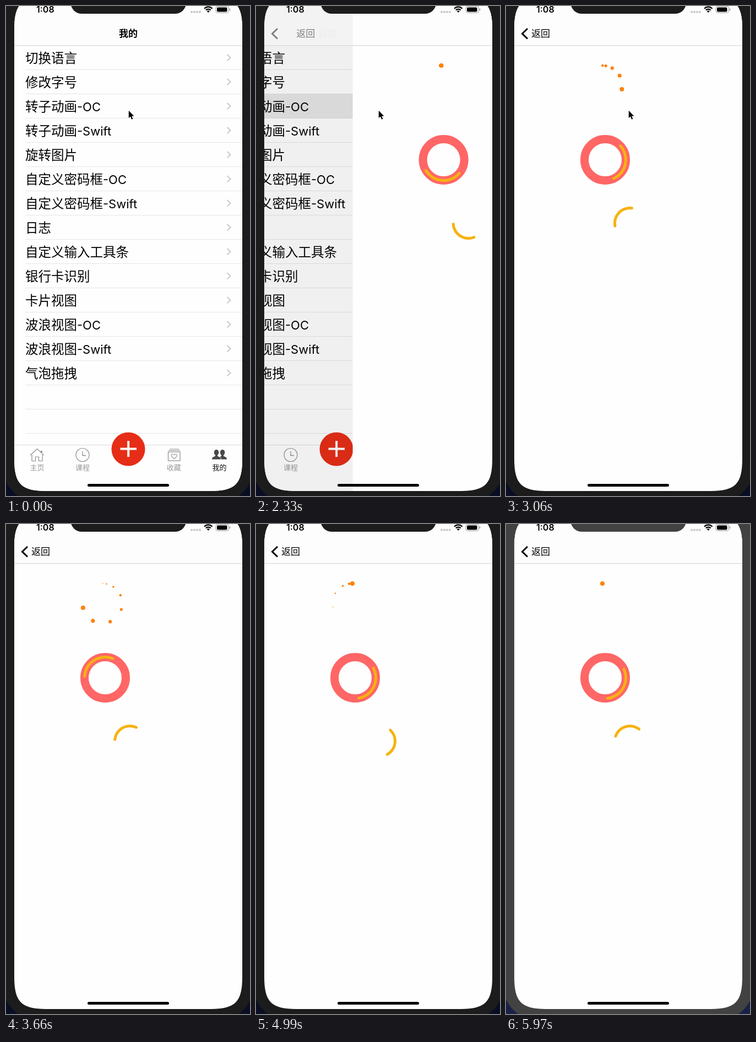
An HTML page with a canvas for the animation above (6.07 s loop, 443 by 889 pixels).

```html
<!DOCTYPE html>
<html lang="zh-CN">
<head>
<meta charset="utf-8">
<style>
html, body { margin: 0; width: 100%; height: 100%; overflow: hidden; background: #0a0e24; }
canvas { display: block; width: 443px; height: 889px; }
</style>
</head>
<body>
<canvas id="stage"></canvas>
<script>
const W = 443, H = 889, LOOP = 6070, TAU = Math.PI * 2;
const CJK = '"Noto Sans CJK SC", sans-serif', LATIN = 'Inter, "Noto Sans CJK SC", sans-serif';
const SX = 15, SW = 414, BOTTOM = 880;
const ROWS = ['切换语言', '修改字号', '转子动画-OC', '转子动画-Swift', '旋转图片', '自定义密码框-OC',
  '自定义密码框-Swift', '日志', '自定义输入工具条', '银行卡识别', '卡片视图', '波浪视图-OC', '波浪视图-Swift', '气泡拖拽'];

const RUNS = [[2210, 2210, 1], [2330, 2430, 2], [2530, 2530, 1], [2650, 2740, 2], [2830, 3060, 4],
  [3120, 3430, 6], [3520, 4110, 10], [4190, 4250, 2], [4340, 4760, 8], [4850, 4990, 3],
  [5040, 5420, 7], [5480, 5800, 6], [5970, 5970, 1]];
// Playback time to app time since the push began
const CLOCK = [[2222, 0], [2530, 324], [3060, 882], [4250, 2148], [4990, 2922], [5970, 3932]];

const canvas = document.getElementById('stage');
const ctx = canvas.getContext('2d');
const dpr = window.devicePixelRatio || 1;
canvas.width = W * dpr;
canvas.height = H * dpr;

const clamp = (v, a = 0, b = 1) => Math.min(b, Math.max(a, v));

function snap(t) {
  const run = RUNS.filter(r => r[0] <= t).pop();
  if (!run) return 0;
  const [first, last, n] = run;
  if (n === 1) return first;
  const step = (last - first) / (n - 1);
  return first + step * Math.min(n - 1, Math.floor((t - first) / step + 1e-6));
}

function appTime(t) {
  if (t <= CLOCK[0][0]) return 0;
  for (let i = 1; i < CLOCK.length; i++) {
    const [t0, a] = CLOCK[i - 1], [t1, b] = CLOCK[i];
    if (t <= t1) return a + (b - a) * (t - t0) / (t1 - t0);
  }
  return CLOCK[CLOCK.length - 1][1];
}

// cubic-bezier(.42, 0, .58, 1)
function easeInOut(x) {
  x = clamp(x);
  let lo = 0, hi = 1;
  for (let i = 0; i < 24; i++) {
    const s = (lo + hi) / 2, r = 1 - s;
    if (3 * r * r * s * .42 + 3 * r * s * s * .58 + s ** 3 < x) lo = s; else hi = s;
  }
  return 3 * (1 - lo) * lo * lo + lo ** 3;
}

function rect(x, y, w, h, color) {
  ctx.fillStyle = color;
  ctx.fillRect(x, y, w, h);
}

function round(x, y, w, h, r, color) {
  ctx.beginPath();
  ctx.roundRect(x, y, w, h, r);
  ctx.fillStyle = color;
  ctx.fill();
}

function disc(x, y, r, color) {
  ctx.beginPath();
  ctx.arc(x, y, r, 0, TAU);
  ctx.fillStyle = color;
  ctx.fill();
}

function arc(x, y, r, from, to, width, color, cap = 'round') {
  ctx.beginPath();
  ctx.arc(x, y, r, from, to);
  ctx.lineWidth = width;
  ctx.lineCap = cap;
  ctx.strokeStyle = color;
  ctx.stroke();
}

function line(points, width, color, cap = 'butt') {
  ctx.beginPath();
  points.forEach(([x, y]) => ctx.lineTo(x, y));
  ctx.lineWidth = width;
  ctx.lineCap = cap;
  ctx.lineJoin = 'miter';
  ctx.strokeStyle = color;
  ctx.stroke();
}

function text(str, x, y, font, color, align = 'left') {
  ctx.font = font;
  ctx.fillStyle = color;
  ctx.textAlign = align;
  ctx.fillText(str, x, y);
}

// Continuous-curvature screen outline
function screenPath() {
  const l = SX, r = SX + SW, t = -16, b = BOTTOM, L = 58, c = 13;
  ctx.beginPath();
  ctx.moveTo(l + L, t);
  ctx.lineTo(r - L, t);
  ctx.bezierCurveTo(r - c, t, r, t + c, r, t + L);
  ctx.lineTo(r, b - L);
  ctx.bezierCurveTo(r, b - c, r - c, b, r - L, b);
  ctx.lineTo(l + L, b);
  ctx.bezierCurveTo(l + c, b, l, b - c, l, b - L);
  ctx.lineTo(l, t + L);
  ctx.bezierCurveTo(l, t + c, l + c, t, l + L, t);
  ctx.closePath();
}

function drawList(highlight) {
  rect(SX, 0, SW, BOTTOM, '#fefefe');
  for (let i = 0; i < 16; i++) rect(35, 115 + 44 * i, 394, 1, '#e6e6e8');
  if (highlight > 0) {
    ctx.globalAlpha = highlight;
    rect(SX, 159.5, SW, 44.5, '#d9d9d9');
    ctx.globalAlpha = 1;
  }
  ROWS.forEach((label, i) => {
    const y = 72 + 44 * i, cut = label.indexOf('-');
    const head = cut < 0 ? label : label.slice(0, cut);
    text(head, 35, y + 30.5, '23.5px ' + CJK, '#000');
    if (cut > 0) {
      const w = ctx.measureText(head).width;
      text(label.slice(cut), 35 + w, y + 30.5, '22px ' + LATIN, '#000');
    }
    line([[401.5, y + 16], [407.5, y + 21.7], [401.5, y + 27.4]], 1.8, '#c5c5c7');
  });
}

function person(x, y) {
  ctx.beginPath();
  ctx.ellipse(x, y, 4.3, 5.3, 0, 0, TAU);
  ctx.roundRect(x - 2, y + 3, 4, 5, 1);
  ctx.moveTo(x - 8, y + 12.5);
  ctx.bezierCurveTo(x - 8, y + 7, x - 3, y + 8.5, x - 2, y + 6);
  ctx.lineTo(x + 2, y + 6);
  ctx.bezierCurveTo(x + 3, y + 8.5, x + 8, y + 7, x + 8, y + 12.5);
  ctx.closePath();
}

function drawTabs() {
  const gray = '#8e8e8e';
  rect(SX, 796, SW, 84, '#fefefe');
  rect(SX, 796, SW, 1, '#dcdcdc');

  line([[44, 815], [56.5, 803.5], [69, 815]], 1.2, gray);
  line([[47, 814], [47, 825.5], [53.5, 825.5], [53.5, 818], [59.5, 818], [59.5, 825.5], [66, 825.5], [66, 814]], 1.2, gray);
  line([[64.5, 810], [64.5, 807]], 3, gray);

  arc(139, 814.5, 12, 0, TAU, 1.2, gray);
  line([[139, 808], [139, 815.5], [145, 815.5]], 1.3, gray);

  ctx.lineWidth = 1.2;
  ctx.strokeRect(294.5, 809, 21.5, 16);
  line([[295, 806.5], [316, 806.5]], 1.1, gray);
  line([[297, 804], [314, 804]], 1.1, gray);
  ctx.beginPath();
  ctx.moveTo(305.3, 821.5);
  ctx.bezierCurveTo(296, 815, 302, 810.5, 305.3, 814.5);
  ctx.bezierCurveTo(308.6, 810.5, 314.6, 815, 305.3, 821.5);
  ctx.stroke();

  ctx.fillStyle = '#484848';
  person(393, 810);
  ctx.fill();
  person(382, 810);
  ctx.strokeStyle = '#fefefe';
  ctx.lineWidth = 1.6;
  ctx.stroke();
  ctx.fill();

  [['主页', 56.5], ['课程', 139], ['收藏', 304.8], ['我的', 387.5]].forEach(([label, x], i) =>
    text(label, x, 842, '13px ' + CJK, i === 3 ? '#111' : '#999', 'center'));

  disc(222, 804, 30.5, '#e62d17');
  line([[207.5, 803.5], [237, 803.5]], 4, '#fff');
  line([[222.2, 789], [222.2, 818]], 4, '#fff');
}

function drawSpinners(p) {
  for (let i = 7; i >= 0; i--) {
    const a = easeInOut((p - 200 * i) / 2400) * TAU;
    disc(175 + 36 * Math.sin(a), 144 - 36 * Math.cos(a), 4 - .45 * i, '#fd820b');
  }
  const span = .3 * TAU, slow = p / 1000 * TAU, fast = p / 600 * TAU;
  arc(180, 279, 37.5, 0, TAU, 15, '#ff6666');
  arc(180, 279, 37.5, slow, slow + span, 5, '#f6b210');
  arc(225, 394, 27.5, fast, fast + span, 5, '#f6b210');
}

function drawNav(left) {
  const shown = 1 - left, off = SW * left;
  rect(SX, 0, SW, 72, shown > 0 ? '#f4f3f3' : '#fdfdfd');
  rect(SX + off, 0, SW - off, 72, '#fdfdfd');
  rect(SX, 71, SW, 1.3, '#dadada');
  ctx.globalAlpha = clamp(1 - shown * 1.6);
  text('我的', 222 - 150 * shown, 56, '600 17px ' + CJK, '#000', 'center');
  ctx.globalAlpha = clamp(shown * 1.6 - .5);
  line([[39, 41], [29.5, 50.2], [39, 59.5]], 3, '#000');
  text('返回', 46 + 70 * left, 56, '17px ' + CJK, '#000');
  ctx.globalAlpha = 1;
}

function drawStatus() {
  text('1:08', 55, 12.3, '600 16px ' + LATIN, '#000');
  for (let i = 0; i < 4; i++) disc(337 + 5 * i, 10.8, 2.1, '#c8c8cb');
  const a = -Math.PI * .75, b = -Math.PI * .25;
  [[1.8, 3.6], [6.3, 2.3], [10.3, 2.3]].forEach(([r, w]) => arc(367.3, 12, r, a, b, w, '#000', 'butt'));
  ctx.beginPath();
  ctx.roundRect(381, .5, 23.5, 11.8, 3.5);
  ctx.lineWidth = 1;
  ctx.strokeStyle = '#989898';
  ctx.stroke();
  round(383, 2.4, 18.5, 8, 2, '#000');
  round(405.7, 4.5, 1.5, 4, 1, '#989898');
}

function drawCursor(x, y) {
  ctx.beginPath();
  [[0, 0], [0, 13.5], [3, 10.8], [5.4, 16], [7.6, 15], [5.3, 10], [9.6, 10]]
    .forEach(([dx, dy]) => ctx.lineTo(x + dx, y + dy));
  ctx.closePath();
  ctx.lineJoin = 'round';
  ctx.lineWidth = 2;
  ctx.strokeStyle = '#fff';
  ctx.stroke();
  ctx.fillStyle = '#000';
  ctx.fill();
}

function draw(time) {
  const t = snap(time), p = appTime(t), faded = t >= 5970;
  const bezel = faded ? '#424242' : '#1c1c1c';
  const wt = p * .0182;
  let left = (1 + wt) * Math.exp(-wt); // critically damped push
  if (left < .001) left = 0;

  ctx.setTransform(dpr, 0, 0, dpr, 0, 0);
  rect(0, 0, W, H, faded ? '#1a2147' : '#0a0e24');
  round(-6, -80, 456, 981, 66, bezel);

  ctx.save();
  screenPath();
  ctx.clip();
  if (left > 0) {
    ctx.save();
    ctx.translate(-.3 * SW * (1 - left), 0);
    drawList(t >= 2210 ? clamp(1 - p / 300) : 0);
    drawTabs();
    ctx.restore();
    rect(SX, 0, SW, BOTTOM, `rgba(0,0,0,${.09 * (1 - left)})`);
  }
  if (left < 1) {
    ctx.save();
    ctx.translate(SW * left, 0);
    rect(SX, 0, SW, BOTTOM, '#fefefe');
    drawSpinners(p);
    ctx.restore();
  }
  drawNav(left);
  drawStatus();
  round(148, 867, 148, 5, 2.5, '#000');
  round(117.5, -40, 209.5, 54, 20, bezel);
  ctx.restore();

  if (t < 3430) {
    const k = easeInOut((t - 3110) / 260);
    drawCursor(222.8 + 180 * k, 189.8 + 690 * k);
  }
}

const start = performance.now();
function tick() {
  draw((performance.now() - start) % LOOP);
  requestAnimationFrame(tick);
}
tick();
</script>
</body>
</html>
```
